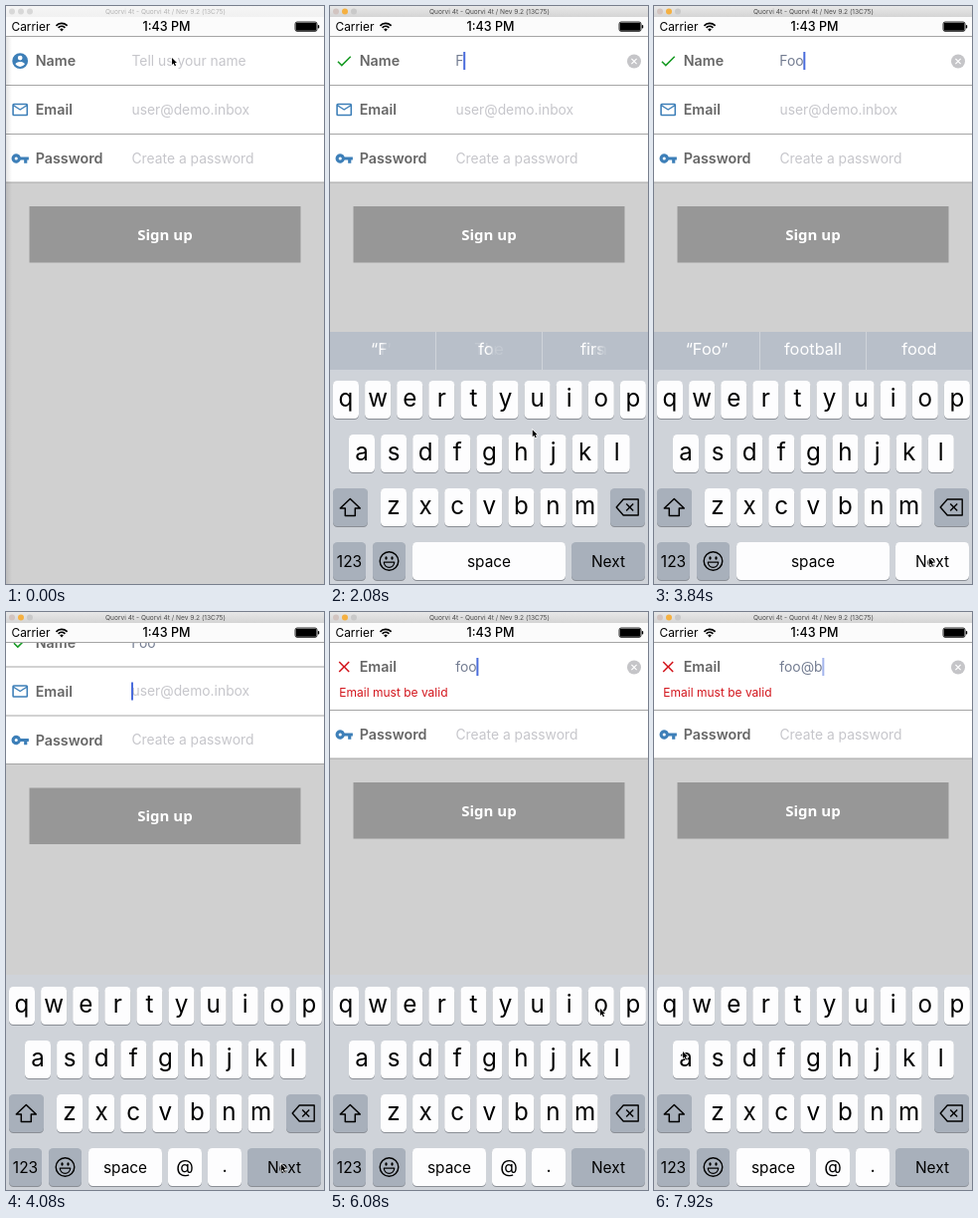
These frames come from a looping animation (320 by 580 pixels, 8000 ms). An HTML page with a canvas:

```html
<!DOCTYPE html>
<html lang="en">
<head>
<meta charset="utf-8">
<title>Sign-up form</title>
<style>
html, body { margin: 0; width: 100%; height: 100%; overflow: hidden; background: #d0d0d0; }
canvas { display: block; width: 320px; height: 580px; }
</style>
</head>
<body>
<canvas id="stage"></canvas>
<script>
const LOOP = 8000;
const canvas = document.getElementById('stage');
const dpr = window.devicePixelRatio || 1;
canvas.width = 320 * dpr;
canvas.height = 580 * dpr;
const c = canvas.getContext('2d');

const BLUE = '#3d7fb8', GREEN = '#159a22', RED = '#d3151c';
const SANS = 'Inter, Roboto, sans-serif';

// Timeline
const FOCUS = 640, NEXT = 3920, LAYOUT = 3980;
const NAME = [[1920, 'F'], [2420, 'o'], [2880, 'o']];
const EMAIL = [[4800, 'f'], [5770, 'o'], [5970, 'o'], [6800, '@'], [7280, 'b']];
const HINTS = [
  [0, ['I', 'The', 'I\'m']],
  [1960, ['“F”', 'for', 'first']],
  [2500, ['“Fo”', 'for', 'food']],
  [2920, ['“Foo”', 'football', 'food']]
];
const POINTER = [
  [400, 167, 52], [480, 158, 55], [1360, 158, 55], [1700, 129, 456],
  [1910, 129, 456], [2240, 272, 397], [3200, 272, 397], [3680, 277, 554],
  [4080, 277, 554], [4600, 134, 456], [5120, 134, 456], [5480, 272, 398],
  [6240, 272, 398], [6600, 180, 555], [7100, 180, 555], [7200, 192, 507],
  [7420, 192, 507], [7600, 196, 437], [7760, 196, 437], [7920, 29, 441]
];

const ROWS = [['qwertyuiop', 3, 376], ['asdfghjkl', 19, 430], ['zxcvbnm', 51, 484]];

const ICONS = {
  person: 'M12 2a10 10 0 1 0 0 20a10 10 0 1 0 0-20zM12 5a3 3 0 1 1 0 6a3 3 0 1 1 0-6zM12 19.2c-2.5 0-4.7-1.3-6-3.2c0-2 4-3.1 6-3.1s6 1.1 6 3.1c-1.3 1.9-3.5 3.2-6 3.2z',
  mail: 'M4 4h16q2 0 2 2v12q0 2-2 2H4q-2 0-2-2V6q0-2 2-2zM4 8v10h16V8l-8 5zM4 6l8 5l8-5z',
  key: 'M12.65 10a6 6 0 1 0 0 4H17v4h4v-4h2v-4zM7 10a2 2 0 1 1 0 4a2 2 0 1 1 0-4z',
  check: 'M9 16.2L4.8 12l-1.4 1.4L9 19L21 7l-1.4-1.4z',
  cross: 'M19 6.4L17.6 5L12 10.6L6.4 5L5 6.4l5.6 5.6L5 17.6L6.4 19l5.6-5.6l5.6 5.6l1.4-1.4l-5.6-5.6z'
};
for (const k in ICONS) ICONS[k] = new Path2D(ICONS[k]);

const clamp = v => Math.max(0, Math.min(1, v));
const span = (t, a, b) => clamp((t - a) / (b - a));
const smooth = u => u * u * (3 - 2 * u);
const easeOut = u => 1 - (1 - u) ** 3;

function rect(x, y, w, h, fill) {
  c.fillStyle = fill;
  c.fillRect(x, y, w, h);
}

function round(x, y, w, h, r, fill) {
  c.fillStyle = fill;
  c.beginPath();
  c.roundRect(x, y, w, h, r);
  c.fill();
}

function disc(x, y, r, fill) {
  c.fillStyle = fill;
  c.beginPath();
  c.arc(x, y, r, 0, 7);
  c.fill();
}

function line(points, color, width, close) {
  c.strokeStyle = color;
  c.lineWidth = width;
  c.beginPath();
  points.forEach(p => c.lineTo(p[0], p[1]));
  if (close) c.closePath();
  c.stroke();
}

// y is the middle of the capitals
function text(s, x, y, size, fill, weight = 400, align = 'left', family = SANS) {
  c.font = `${weight} ${size}px ${family}`;
  c.textAlign = align;
  c.fillStyle = fill;
  c.fillText(s, x, y + size * 0.36);
  return c.measureText(s).width;
}

function icon(name, x, y, color) {
  c.save();
  c.translate(x, y);
  c.scale(0.79, 0.79);
  c.translate(-12, -12);
  c.fillStyle = color;
  c.fill(ICONS[name], 'evenodd');
  c.restore();
}

const typed = (keys, t) => keys.filter(k => t >= k[0]).map(k => k[1]).join('');

function caretAlpha(t) {
  const starts = [FOCUS, NEXT, ...[...NAME, ...EMAIL].map(k => k[0])].filter(s => s <= t);
  const p = (t - Math.max(...starts)) % 1000;
  return p < 780 ? 1 - span(p, 560, 720) : span(p, 840, 950);
}

function field(y, label, value, hint, active, t) {
  text(label, 29.7, y, 14.3, '#666', 600);
  let w = 0;
  if (value) w = text(value, 126.3, y, 13.9, '#747d92');
  else text(hint, 126.5, y, 13.85, '#c6c6cb');
  if (!active) return;
  c.globalAlpha = caretAlpha(t);
  rect(126 + w, y - 9, 2, 18, '#4a6cdc');
  c.globalAlpha = 1;
  if (value) {
    disc(306, y + 0.5, 7, '#c5c5c8');
    const d = 2.6;
    line([[306 - d, y + 0.5 - d], [306 + d, y + 0.5 + d]], '#fff', 1.2);
    line([[306 - d, y + 0.5 + d], [306 + d, y + 0.5 - d]], '#fff', 1.2);
  }
}

function form(t) {
  const name = typed(NAME, t), email = typed(EMAIL, t);
  const up = 49 * smooth(span(t, NEXT, 4240));
  const error = smooth(span(t, 4760, 4860));
  const low = 19 * error - up;
  const onEmail = t >= NEXT;

  rect(0, 0, 320, 580, '#d0d0d0');
  rect(0, 31 - up, 320, 146 + 19 * error, '#fff');
  for (const y of [79 - up, 128 + low, 176.5 + low]) rect(0, y, 320, 1, '#a6a6a6');

  icon(name ? 'check' : 'person', 14.2, 55.2 - up, name ? GREEN : BLUE);
  field(55 - up, 'Name', name, 'Tell us your name', t >= FOCUS && !onEmail, t);
  icon(email ? 'cross' : 'mail', 14.2, 104 - up, email ? RED : BLUE);
  field(104 - up, 'Email', email, 'user@demo.inbox', onEmail, t);
  if (error) {
    c.globalAlpha = error;
    text('Email must be valid', 9.3, 129.5 - up, 12, RED);
    c.globalAlpha = 1;
  }
  icon('key', 14.2, 153 + low, BLUE);
  field(153 + low, 'Password', '', 'Create a password', false, t);

  rect(23.5, 201 + low, 273, 56.5, '#979797');
  text('Sign up', 160, 229.5 + low, 15, '#fff', 600, 'center', '"Noto Sans", sans-serif');

  // Soft edge while the window is inactive
  if (t < FOCUS) {
    const g = c.createLinearGradient(0, 0, 6, 0);
    g.addColorStop(0, 'rgba(0,0,0,.1)');
    g.addColorStop(1, 'rgba(0,0,0,0)');
    rect(0, 31, 6, 549, g);
  }
}

function bars(t) {
  const on = t >= FOCUS;
  const g = c.createLinearGradient(0, 0, 0, 11);
  g.addColorStop(0, on ? '#e8e8e8' : '#f5f5f5');
  g.addColorStop(1, on ? '#d4d4d4' : '#f1f1f1');
  rect(0, 0, 320, 11, g);
  const dots = on ? ['#d2c4c0', '#f5b041', '#c9c9c9'] : ['#d8d8d8', '#d8d8d8', '#d8d8d8'];
  dots.forEach((d, i) => disc(6 + i * 9, 5.5, 3, d));
  text('Quorvi 4t - Quorvi 4t / Nev 9.2 (13C75)', 160.5, 5.5, 6.6, on ? '#4c4c4c' : '#b4b4b4', 400, 'center');

  rect(0, 11, 320, 19, '#fbfbfb');
  rect(0, 30, 320, 1, '#a6a6a6');
  text('Carrier', 5.5, 20.5, 11.9, '#000');
  text('1:43 PM', 161.5, 20.5, 12.6, '#000', 500, 'center');

  c.strokeStyle = '#000';
  c.lineWidth = 1.7;
  for (const r of [4.6, 7.6]) {
    c.beginPath();
    c.arc(56, 25, r, -Math.PI * 0.76, -Math.PI * 0.24);
    c.stroke();
  }
  c.fillStyle = '#000';
  c.beginPath();
  c.moveTo(56, 25.4);
  c.arc(56, 25, 2.4, -Math.PI * 0.77, -Math.PI * 0.23);
  c.fill();

  c.lineWidth = 0.8;
  c.beginPath();
  c.roundRect(291, 16, 22, 9.4, 2);
  c.stroke();
  round(291.7, 16.7, 20.6, 8, 1, '#000');
  round(313.8, 19, 1.4, 3.4, 0.7, '#000');
}

function key(x, y, w, fill = '#fdfdfe') {
  round(x, y + 1, w, 38, 4.5, '#8a8e95');
  round(x, y, w, 38, 4.5, fill);
}

function shiftIcon(x, y, filled) {
  const p = [[-10, 0.5], [0, -9], [10, 0.5], [5, 0.5], [5, 8], [-5, 8], [-5, 0.5]]
    .map(q => [x + q[0], y + q[1]]);
  c.lineJoin = 'round';
  line(p, '#000', 1.5, true);
  if (filled) {
    c.fillStyle = '#000';
    c.fill();
  }
}

function deleteIcon(x, y) {
  c.lineJoin = 'round';
  line([[x - 11, y], [x - 4, y - 8], [x + 11, y - 8], [x + 11, y + 8], [x - 4, y + 8]], '#000', 1.4, true);
  line([[x - 1, y - 3.5], [x + 6, y + 3.5]], '#000', 1.4);
  line([[x - 1, y + 3.5], [x + 6, y - 3.5]], '#000', 1.4);
}

function smiley(x, y) {
  c.strokeStyle = '#000';
  c.lineWidth = 1.4;
  c.beginPath();
  c.arc(x, y, 9.3, 0, 7);
  c.stroke();
  for (const s of [-1, 1]) {
    c.fillStyle = '#000';
    c.beginPath();
    c.ellipse(x + s * 3, y - 3, 1.2, 1.7, 0, 0, 7);
    c.fill();
  }
  c.lineWidth = 1.2;
  c.beginPath();
  c.arc(x, y + 1.2, 5.2, 0, Math.PI);
  c.closePath();
  c.stroke();
}

// New words wipe in from the left while the old ones fade
function hints(t) {
  const i = HINTS.filter(h => t >= h[0]).length - 1;
  const u = i ? span(t, HINTS[i][0], HINTS[i][0] + 200) : 1;
  rect(0, 327, 320, 38, '#b8bfc9');
  for (const x of [106, 213]) rect(x, 327, 1, 38, '#d0d4da');
  for (let k = 0; k < 3; k++) {
    const x = 53 + k * 107, word = HINTS[i][1][k];
    const changed = i && HINTS[i - 1][1][k] !== word;
    let fill = '#fff';
    if (changed && u < 1) {
      const old = clamp(1 - 1.4 * u);
      text(HINTS[i - 1][1][k], x, 344, 16.4, `rgba(255,255,255,${old})`, 400, 'center');
      const w = c.measureText(word).width, edge = u * 1.4;
      fill = c.createLinearGradient(x - w / 2, 0, x + w / 2, 0);
      fill.addColorStop(clamp(edge - 0.4), '#fff');
      fill.addColorStop(clamp(edge), 'rgba(255,255,255,0)');
    }
    text(word, x, 344, 16.4, fill, 400, 'center');
  }
}

function popup(x, y, w, s) {
  const m = x + w / 2, l = m - 26, r = m + 26, top = y - 63, k = x + w, b = y + 38;
  c.save();
  c.shadowColor = 'rgba(0,0,0,.45)';
  c.shadowBlur = 4 * dpr;
  c.fillStyle = '#fdfdfe';
  c.beginPath();
  c.moveTo(l + 9, top);
  c.arcTo(r, top, r, top + 9, 9);
  c.lineTo(r, y - 19);
  c.bezierCurveTo(r, y - 8, k, y - 9, k, y + 4);
  c.arcTo(k, b, m, b, 4.5);
  c.arcTo(x, b, x, y, 4.5);
  c.lineTo(x, y + 4);
  c.bezierCurveTo(x, y - 9, l, y - 8, l, y - 19);
  c.arcTo(l, top, l + 9, top, 9);
  c.fill();
  c.restore();
  text(s, m, top + 28.5, 36, '#000', 400, 'center');
}

function keyboard(t) {
  const rise = easeOut(span(t, 700, 1104));
  if (!rise) return;
  const GREY = '#a8b0bb';
  const mailMode = t >= LAYOUT, upper = t < NAME[0][0];
  c.save();
  c.translate(0, 253 * (1 - rise));
  rect(0, 364, 320, 216, '#cfd3d9');
  if (!mailMode) hints(t);

  for (const [letters, x0, y] of ROWS) {
    [...letters].forEach((s, i) => {
      const x = x0 + i * 32.1;
      key(x, y, 26);
      if (upper) text(s.toUpperCase(), x + 13, y + 19, 22.5, '#000', 400, 'center');
      else text(s, x + 13, y + 17, 24.2, '#000', 400, 'center');
    });
  }
  key(3, 484, 35, upper ? '#fdfdfe' : GREY);
  shiftIcon(20.3, 503.5, upper);
  key(282, 484, 35, GREY);
  deleteIcon(299.2, 503);

  const y = 538, mid = 557;
  key(3, y, 33, GREY);
  text('123', 19.5, mid + 0.5, 15.5, '#000', 400, 'center');
  key(43, y, 33, GREY);
  smiley(59.5, mid);
  key(83, y, mailMode ? 74 : 154);
  text('space', mailMode ? 120 : 160, mid, 15.4, '#000', 400, 'center');
  if (mailMode) {
    key(163, y, 34);
    text('@', 180, mid - 1, 18.2, '#000', 400, 'center');
    key(203, y, 34);
    text('.', 220, mid - 1, 18, '#000', 400, 'center');
  }
  const pressed = t >= 3760 && t < NEXT;
  key(243, y, 74, pressed ? '#fdfdfe' : GREY);
  text('Next', 280, mid, 15.4, '#000', 400, 'center');

  const hit = [...NAME, ...EMAIL].find(k => t >= k[0] - 90 && t < k[0] + 100);
  if (hit) {
    const s = hit[1];
    if (s === '@') popup(163, y, 34, s);
    for (const [letters, x0, top] of ROWS) {
      const i = letters.indexOf(s.toLowerCase());
      if (i >= 0) popup(x0 + i * 32.1, top, 26, s);
    }
  }
  c.restore();
}

function pointer(t) {
  let [, x, y] = POINTER[0];
  for (let i = 1; i < POINTER.length; i++) {
    const a = POINTER[i - 1], b = POINTER[i];
    if (t < a[0]) break;
    const u = smooth(span(t, a[0], b[0]));
    x = a[1] + (b[1] - a[1]) * u;
    y = a[2] + (b[2] - a[2]) * u;
  }
  const shape = [[0, 0], [0, 7], [1.6, 5.6], [2.8, 8.2], [4, 7.7], [2.9, 5.1], [5, 5]]
    .map(p => [x + p[0], y + p[1]]);
  line(shape, '#fff', 1.2, true);
  c.fillStyle = '#000';
  c.fill();
}

function draw(now) {
  const t = now % LOOP;
  c.setTransform(dpr, 0, 0, dpr, 0, 0);
  form(t);
  bars(t);
  keyboard(t);
  pointer(t);
}

let start;
function tick(now) {
  start ??= now;
  draw(now - start);
  requestAnimationFrame(tick);
}
draw(0);
requestAnimationFrame(tick);
</script>
</body>
</html>
```
